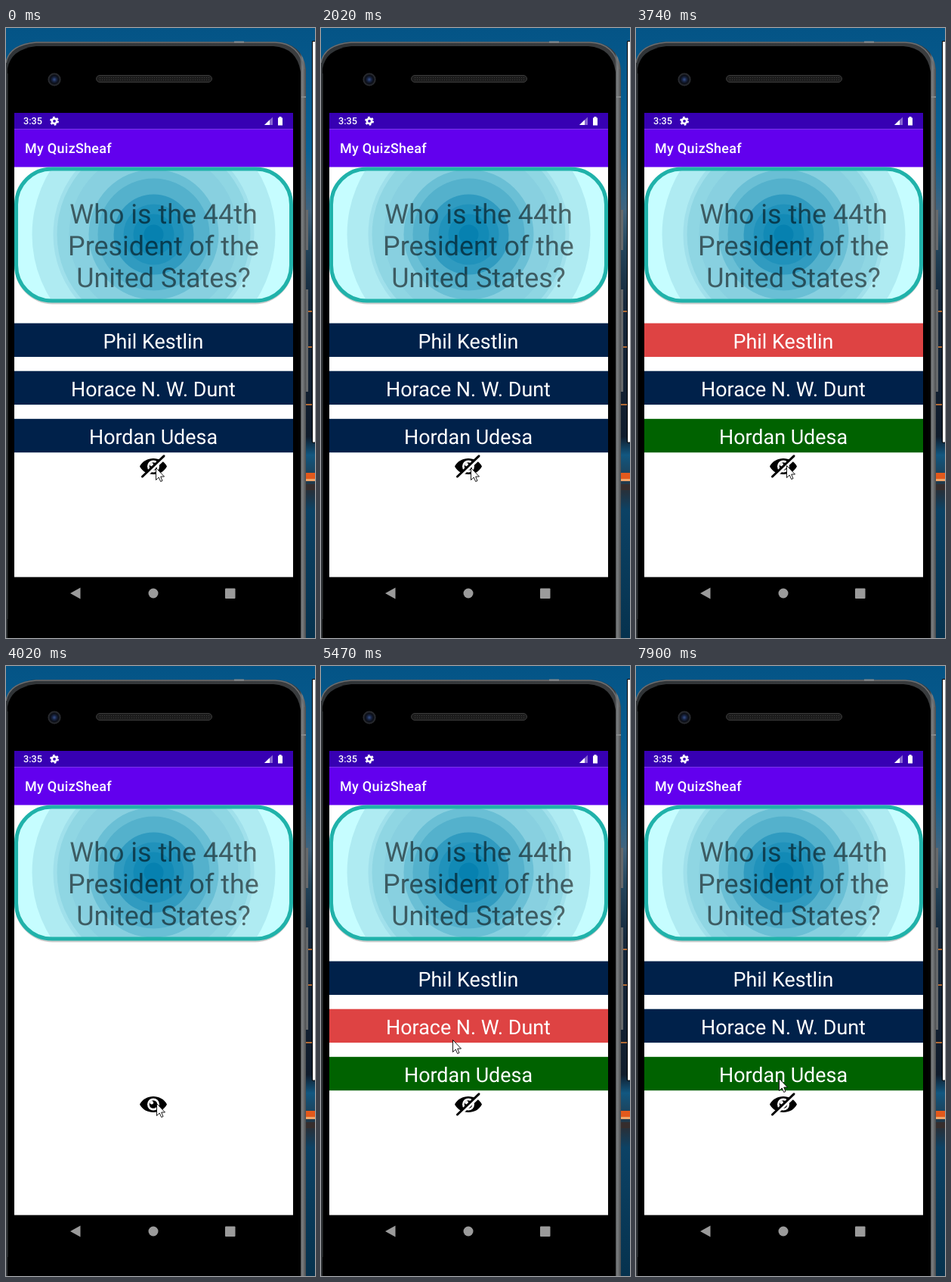
Write an HTML page that moves like this. It is 409 px wide and 805 px high and loops after 8 s.

```html
<!DOCTYPE html>
<html lang="en">
<head>
<meta charset="utf-8">
<title>Quiz app</title>
<style>
  html, body { margin: 0; width: 100%; height: 100%; overflow: hidden; background: #000; }
  svg { display: block; width: 409px; height: 805px; font-family: Roboto, sans-serif; text-rendering: geometricPrecision; }
  .answer { font-size: 26.9px; fill: #fff; text-anchor: middle; }
  .question { font-size: 35.88px; fill: #000; fill-opacity: .56; text-anchor: middle; }
</style>
</head>
<body>
<svg viewBox="0 0 409 805">
  <defs>
    <linearGradient id="sky" x2="0" y2="1">
      <stop offset="0" stop-color="#045486"/>
      <stop offset=".2" stop-color="#0a6296"/>
      <stop offset=".3" stop-color="#41637d"/>
      <stop offset=".36" stop-color="#23445a"/>
      <stop offset=".45" stop-color="#16283b"/>
      <stop offset=".67" stop-color="#101c2c"/>
      <stop offset=".7" stop-color="#125780"/>
      <stop offset=".76" stop-color="#26313c"/>
      <stop offset=".79" stop-color="#0c4265"/>
      <stop offset="1" stop-color="#06324e"/>
    </linearGradient>
    <linearGradient id="rim">
      <stop offset="0" stop-color="#303437"/>
      <stop offset=".98" stop-color="#3a3c3e"/>
      <stop offset=".988" stop-color="#7d8082"/>
      <stop offset="1" stop-color="#4b4d4f"/>
    </linearGradient>
    <radialGradient id="lens">
      <stop offset="0" stop-color="#35508c"/>
      <stop offset=".35" stop-color="#17223f"/>
      <stop offset=".65" stop-color="#0b0e16"/>
      <stop offset="1" stop-color="#34363a"/>
    </radialGradient>
    <clipPath id="cardClip"><rect x="13" y="185.500" width="365" height="175" rx="46"/></clipPath>
  </defs>

  <!-- Desktop -->
  <rect width="409" height="805" fill="url(#sky)"/>
  <path d="M397 374h8m-8 47h8m-8 76h8" stroke="#b06a35" stroke-width="2"/>
  <path d="M397 587h12v8h-12z" fill="#e2591c"/>
  <path d="M397 595h12v3h-12z" fill="#f0a66a"/>
  <path d="M397 602h12v8h-12z" fill="#352d2d"/>
  <path d="M410 17.5h-4.5v529.5h4.5" fill="#fff" stroke="#000"/>

  <!-- Phone -->
  <path d="M0 805V46Q4 21 40 18H356Q393 20 397 54V805Z" fill="url(#rim)"/>
  <path d="M0 46Q4 22 40 19H356Q389 20 394.500 54" fill="none" stroke="#6c6f72" stroke-width="1.5"/>
  <path d="M2 805V54Q6 28 40 24H354Q385 26 390 58V805Z"/>
  <path d="M302 18.500h13M391 91h6" stroke="#85888a" stroke-width="2"/>
  <path d="M2.5 60V780" stroke="#1d1f20"/>
  <path d="M397 240h3v53h-3zM397 345h3v135h-3z" fill="#66696b"/>
  <circle cx="64" cy="68" r="8.5" fill="url(#lens)"/>
  <rect x="119.5" y="62.5" width="153" height="9" rx="4.5" fill="#1c1c1c" stroke="#3b3b3b"/>
  <path d="M124 65.5H269M124 68.5H269" stroke="#3c3c3c" stroke-dasharray="1 2"/>

  <!-- Screen -->
  <rect x="11" y="112" width="369" height="612.600" fill="#fff"/>
  <rect x="11" y="112" width="369" height="21.300" fill="#3700b3"/>
  <rect x="11" y="133.300" width="369" height="50.200" fill="#6200ee"/>
  <g fill="#fff" font-weight="500">
    <text x="23" y="127.400" font-size="12.6">3:35</text>
    <text x="25" y="165.200" font-size="17.94" letter-spacing=".3">My QuizSheaf</text>
  </g>
  <circle cx="64" cy="122.800" r="3.2" fill="none" stroke="#fff" stroke-width="2.6"/>
  <circle cx="64" cy="122.800" r="5" fill="none" stroke="#fff" stroke-width="2" stroke-dasharray="2.6 2.636"/>
  <path d="M342 128L353 117.500V128Z" fill="#fff" fill-opacity=".4"/>
  <path d="M342 128L349 121.300V128Z" fill="#fff"/>
  <path d="M360 118.500h1.500v-1.500h3v1.500h1.500v10h-6z" fill="#fff"/>

  <!-- Question card -->
  <rect x="11.500" y="185" width="368" height="179.500" rx="50" fill="#000" fill-opacity=".2"/>
  <g id="rings" clip-path="url(#cardClip)"><rect x="11" y="183" width="369" height="180" fill="#c6fdff"/></g>
  <rect x="13.500" y="186" width="364" height="174" rx="47" fill="none" stroke="#20b2aa" stroke-width="5"/>
  <g class="question">
    <text x="208.500" y="258.400">Who is the 44th</text>
    <text x="208.500" y="300.400">President of the</text>
    <text x="208.500" y="342.400">United States?</text>
  </g>

  <g id="answers"></g>

  <!-- Visibility toggle -->
  <path d="M177 578.500C184 564.500 206 564.500 213 578.500C206 592.500 184 592.500 177 578.500Z"/>
  <circle cx="195" cy="578.500" r="8" fill="#fff"/>
  <circle cx="195" cy="578.500" r="5.300"/>
  <circle cx="192.800" cy="576.200" r="2.300" fill="#fff"/>
  <g id="slash" stroke-linecap="round">
    <path d="M181.500 594L211 566.500" stroke="#fff" stroke-width="4"/>
    <path d="M180.500 592L209 564.800" stroke="#000" stroke-width="3"/>
  </g>

  <!-- Navigation bar -->
  <g fill="#9b9b9b">
    <path d="M85 746L98.500 738.500V753.500Z"/>
    <circle cx="195" cy="746" r="6.500"/>
    <rect x="290" y="739.500" width="13.500" height="13.500" rx="1"/>
  </g>

  <path id="cursor" d="M.5.5V16.500L4.200 13L6.700 18.500L9 17.500L6.700 12H11.500Z" fill="#fff" stroke="#000" stroke-width=".9"/>
</svg>
<script>
const LOOP = 8000;
const NAVY = '#00214a', RED = '#de4343', GREEN = '#006200';
const $ = id => document.getElementById(id);

function add(parent, tag, attrs, text = '') {
  const node = document.createElementNS('http://www.w3.org/2000/svg', tag);
  for (const key in attrs) node.setAttribute(key, attrs[key]);
  node.textContent = text;
  return parent.appendChild(node);
}

// Concentric discs: radius, colour
[[161, '#afebf2'], [133, '#a0e0eb'], [128, '#8fd6e3'], [112, '#88d0e0'], [86, '#6abfd5'],
 [74, '#54b1cc'], [53, '#309bc0'], [40, '#2092bb'], [27, '#128ab6'], [13, '#0681b0']]
  .forEach(([r, fill]) => add($('rings'), 'circle', { cx: 195.5, cy: 272.5, r, fill }));

const bars = ['Phil Kestlin', 'Horace N. W. Dunt', 'Hordan Udesa'].map((name, i) => {
  const y = 389.6 + i * 63.1;
  const bar = add($('answers'), 'rect', { x: 11, y, width: 369, height: 44.4 });
  add($('answers'), 'text', { x: 195, y: y + 33.2, class: 'answer' }, name);
  return bar;
});

// The pointer moves in sampled steps: time, x, y
const pointer = [
  [0, 198, 580], [2270, 198, 575], [2420, 212, 490], [2540, 222, 393], [2690, 223, 377],
  [2810, 219, 400], [2930, 217, 411], [3200, 224, 520], [3320, 227, 599], [3470, 207, 589],
  [3620, 200, 576], [3740, 199, 577], [4920, 187, 548], [5040, 177, 516], [5190, 174, 493],
  [5590, 175, 487], [5740, 176, 485], [6010, 187, 515], [6130, 204, 560], [6250, 213, 589],
  [6400, 193, 579], [7480, 189, 554], [7630, 188, 537], [7750, 189, 544]
];

// Answer colours: time, one colour per bar
const marks = [
  [0, NAVY, NAVY, NAVY], [3080, RED, NAVY, GREEN], [4770, NAVY, NAVY, NAVY],
  [5470, NAVY, RED, GREEN], [7330, NAVY, NAVY, NAVY], [7900, NAVY, NAVY, GREEN]
];

const hiddenSpans = [[930, 2020], [4020, 4770], [6680, 7330]];

const latest = (steps, t) => steps.filter(step => step[0] <= t).pop();

function draw(t) {
  const hidden = hiddenSpans.some(([from, to]) => t >= from && t < to);
  const [, x, y] = latest(pointer, t);
  const [, ...colours] = latest(marks, t);
  bars.forEach((bar, i) => bar.setAttribute('fill', colours[i]));
  for (const id of ['answers', 'slash']) $(id).style.display = hidden ? 'none' : '';
  $('cursor').setAttribute('transform', `translate(${x} ${y})`);
}

const start = performance.now();
function tick() {
  draw((performance.now() - start) % LOOP);
  requestAnimationFrame(tick);
}
tick();
</script>
</body>
</html>
```
